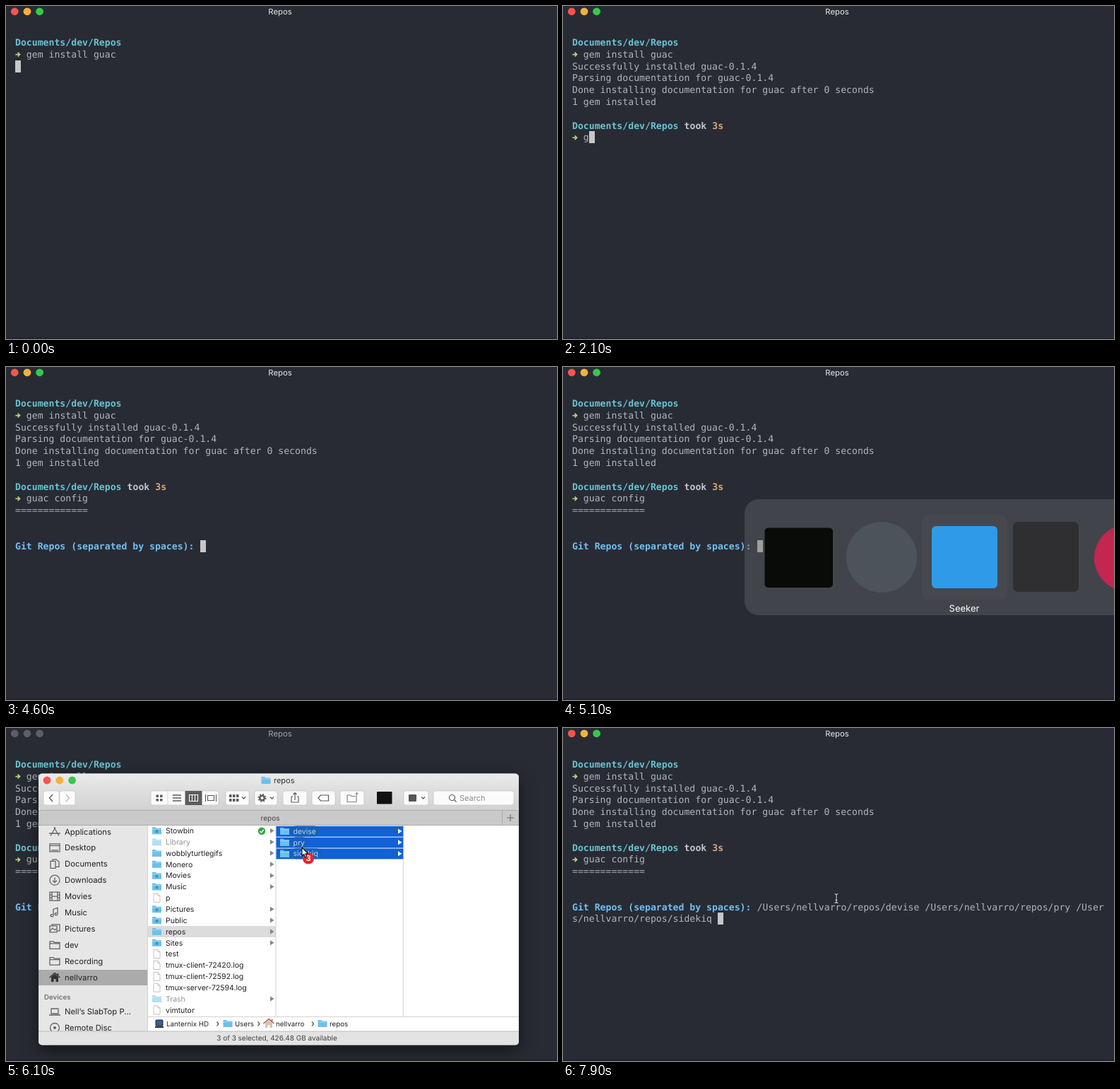
An HTML page for the animation above (8000 ms loop, 780 by 471 pixels).

```html
<!DOCTYPE html>
<html lang="en">
<head>
<meta charset="utf-8">
<title>Repos</title>
<style>
  html, body { margin: 0; width: 100%; height: 100%; overflow: hidden; background: #282b34; }
  svg { display: block; width: 100vw; height: 100vh; text-rendering: geometricPrecision; }
  text { font-family: Inter, "Open Sans", sans-serif; white-space: pre; }
  .mono { font: 13.17px "DejaVu Sans Mono", monospace; }
  .bold { font-weight: 700; }
  .window { filter: drop-shadow(0 7px 11px rgba(0,0,0,.5)); }
</style>
</head>
<body>
<svg id="stage" viewBox="0 0 780 471"></svg>
<script>
const LOOP = 8000, STEP = 100;
const COL = 7.93, ROW = 16.8, LEFT = 13;
const USER = 'nellvarro';
const INK = '#b0b4bb', CYAN = '#67c3d0', BLUE = '#70c0f2', ORANGE = '#d5a878', LIME = '#b9d77c';
const LIGHTS = ['#f5554c', '#f6b03c', '#36c849'];
const stage = document.getElementById('stage');

// drawing helpers
function el(parent, tag, attrs = {}, content) {
  const node = document.createElementNS('http://www.w3.org/2000/svg', tag);
  for (const key in attrs) node.setAttribute(key, attrs[key]);
  if (content !== undefined) node.textContent = content;
  parent.append(node);
  return node;
}
const group = (p, x = 0, y = 0) => el(p, 'g', { transform: `translate(${x} ${y})` });
const box = (p, x, y, width, height, fill, rx = 0, more = {}) =>
  el(p, 'rect', { x, y, width, height, fill, rx, ...more });
const dot = (p, cx, cy, r, fill, more = {}) => el(p, 'circle', { cx, cy, r, fill, ...more });
const ring = (p, x, y, r, color, width = 1.2, more = {}) =>
  dot(p, x, y, r, 'none', { stroke: color, 'stroke-width': width, ...more });
const stroke = (p, d, color, width = 1.2) =>
  el(p, 'path', { d, fill: 'none', stroke: color, 'stroke-width': width });
const label = (p, x, y, size, content, fill = '#222', more = {}) =>
  el(p, 'text', { x, y: y + size * .36, 'font-size': size, fill, ...more }, content);
const triangle = (p, x, y, fill) =>
  el(p, 'path', { d: `M${x} ${y - 3.5}l5.5 3.5l-5.5 3.5z`, fill });
const middle = { 'text-anchor': 'middle' };
const show = (node, on) => { node.style.display = on ? '' : 'none'; };

function mono(p, col, row, content, fill = INK, bold = false) {
  return el(p, 'text', {
    class: bold ? 'mono bold' : 'mono',
    x: LEFT + col * COL, y: 56 + row * ROW, fill
  }, content);
}
function folder(p, x, y) {
  const g = group(p, x, y);
  el(g, 'path', { d: 'M-6.5-5h4.5l1.5 1.5h7v8.5h-13z', fill: '#6cc0ea' });
  stroke(g, 'M-6.5-2.2h13', '#a5dcf6', .8);
  return g;
}
function house(p, x, y, fill, roof = fill) {
  const g = group(p, x, y);
  el(g, 'path', { d: 'M-5-1v7h3.5v-4h3v4h3.5v-7l-5-4z', fill });
  stroke(g, 'M-7.5 0L0-6.5L7.5 0M4.5-6v3', roof, 1.5);
}

// ---------- terminal ----------
const term = group(stage);
box(term, 0, 0, 780, 471, '#282b34');
box(term, 0, 469.5, 780, 1.5, '#1d2027');
box(term, 0, 0, 1, 471, '#30272f');
const lights = [12.3, 30, 47.6].map(x => dot(term, x, 7.8, 5.4, '#000'));
const title = label(term, 388, 8, 11.3, 'Repos', '#e9e9ea', middle);

function prompt(p, row, took) {
  mono(p, 0, row, 'Documents/dev/Repos', CYAN, true);
  if (took) {
    mono(p, 20, row, 'took', '#c0c4cb', true);
    mono(p, 25, row, took, ORANGE, true);
  }
  const y = 51.8 + (row + 1) * ROW;
  stroke(p, `M13.4 ${y}h5.6M16.6 ${y - 2.9}l3 2.9l-3 2.9`, LIME, 1.6);
}
prompt(term, 0);
mono(term, 2, 1, 'gem install guac');

const parts = [];
function part(from, draw) {
  const g = group(term);
  draw(g);
  parts.push({ g, from });
}
part(400, g => {
  mono(g, 0, 2, 'Successfully installed guac-0.1.4');
  mono(g, 0, 3, 'Parsing documentation for guac-0.1.4');
});
part(500, g => {
  mono(g, 0, 4, 'Done installing documentation for guac after 0 seconds');
  mono(g, 0, 5, '1 gem installed');
});
part(700, g => prompt(g, 7, '3s'));
part(3800, g => {
  mono(g, 0, 9, '='.repeat(13), '#a0a4aa');
  mono(g, 0, 12, 'Git Repos (separated by spaces):', BLUE, true);
});
part(7100, g => {
  const home = `/Users/${USER}/repos/`;
  const line = ['devise', 'pry', 'sidekiq'].map(n => home + n).join(' ');
  mono(g, 33, 12, line.slice(0, 62));
  mono(g, 0, 13, line.slice(62));
});
const COMMAND = 'guac config';
const KEYS = [2100, 2200, 2300, 2400, 2600, 2700, 2800, 3000, 3100, 3200, 3400];
const typed = mono(term, 2, 8, '');
const block = box(term, 0, 0, 8, 17, '#c7c7c8');

function blockAt(t, count) {
  if (t < 400) return [0, 2];
  if (t < 500) return [0, 4];
  if (t < 700) return [0, 6];
  if (t < 3800) return [2 + count, 8];
  return t < 7100 ? [33, 12] : [26, 13];
}

// ---------- file window ----------
const win = group(stage);
win.setAttribute('class', 'window');
const defs = el(stage, 'defs');
const bar = el(defs, 'linearGradient', { id: 'bar', x2: 0, y2: 1 });
el(bar, 'stop', { offset: 0, 'stop-color': '#ebeaeb' });
el(bar, 'stop', { offset: 1, 'stop-color': '#d3d2d3' });
box(win, 46, 64.5, 680, 384, '#e9e8e9', 5);
box(win, 46, 64.5, 680, 51.5, 'url(#bar)', 5);
stroke(win, 'M50 65h672', '#f6f6f6', 1);
LIGHTS.forEach((c, i) => dot(win, 58 + i * 17.8, 74, 5.4, c));
folder(win, 368, 74);
label(win, 379, 74, 11, 'repos', '#333');

// toolbar
const DARK = '#5b5b5d';
const BUTTONS = [[53, 22], [76, 22], [205, 96], [311, 33], [352, 32], [392, 34],
  [433, 33], [473, 34], [563, 35], [605, 114]];
for (const [x, width] of BUTTONS)
  box(win, x, 89, width, 20, '#fbfbfb', 3, { stroke: '#c3c2c3', 'stroke-width': .7 });
stroke(win, 'M66 94l-4.5 5l4.5 5', DARK, 1.4);
stroke(win, 'M85 94l4.5 5l-4.5 5', '#b9b9b9', 1.4);
box(win, 253.5, 89, 24, 20, '#5d5d60');
stroke(win, 'M229 89v20', '#c9c9c9', .7);
for (const x of [212.5, 218]) for (const y of [94.5, 100]) box(win, x, y, 3.5, 3.5, DARK, .5);
stroke(win, 'M236 95h12M236 99h12M236 103h12', DARK, 1.3);
stroke(win, 'M259.5 94.5h12v9h-12zM263.5 94v10M267.5 94v10', '#fff', 1.1);
stroke(win, 'M285.5 95.5h9v7h-9zM282.5 94v10M297.5 94v10', DARK, 1.1);
for (const x of [316, 321, 326]) for (const y of [94, 100]) box(win, x, y, 3.5, 4, DARK, .5);
stroke(win, 'M334 97.5l2.5 2.5l2.5-2.5M374 97.5l2.5 2.5l2.5-2.5M588 97.5l2.5 2.5l2.5-2.5', DARK, 1.3);
ring(win, 362.5, 99, 3.3, DARK, 2.4);
ring(win, 362.5, 99, 5.2, DARK, 1.6, { 'stroke-dasharray': '2 2.08' });
stroke(win, 'M406 97h-2v8h10v-8h-2M409 102v-10M406.5 94l2.5-2.5l2.5 2.5', DARK);
stroke(win, 'M442 99l3.5-4h11v8h-11z', DARK);
stroke(win, 'M483 95h5l1 1.5h7v8h-13zM494 93h5M496.5 90.5v5', '#858587');
box(win, 525, 90, 21.5, 17.5, '#111', 1);
box(win, 570, 94, 11, 10, '#555', 1);
stroke(win, 'M634.5 101.5l3 3', DARK);
ring(win, 631.5, 98.5, 4, DARK);
label(win, 642, 99, 11, 'Search', '#8b8b8d');

// tab strip
box(win, 46, 116, 680, 21.5, '#cac9ca');
stroke(win, 'M46 116.5h680M46 137.5h680M702.5 116v21', '#aeadae', 1);
label(win, 374, 127, 10, 'repos', '#444', middle);
stroke(win, 'M714 122v10M709 127h10', '#666', 1.1);

// sidebar
const FOLDER = 'M-7-5h5l1.5 1.5h7.5v9h-14zM-7-2h14';
const PLACES = [
  ['Applications', 'M-6 6L1-6M6 6L-1-6M-8 2.5h16'],
  ['Desktop', 'M-7-5.5h14v11h-14zM-7-3h14M-5 3.5h10'],
  ['Documents', 'M-6-4h7v10h-7zM-3-4v-2.5h5l4 3.5v7h-5'],
  ['Downloads', 'M-7 0a7 7 0 1 0 14 0a7 7 0 1 0-14 0M0-4v7M-3 .5l3 3l3-3'],
  ['Movies', 'M-7-6h14v12h-14zM-4-6v12M4-6v12M-4 0h8M-7-2h3M-7 2h3M4-2h3M4 2h3'],
  ['Music', 'M-2 4.5v-9l6-2v9M-2 4.5a2 1.5 0 1 1-1-1.5M4 2.5a2 1.5 0 1 1-1-1.5'],
  ['Pictures', 'M-7-4h10v9h-10zM-4-4v-2h11v9h-4M-6 3l3-4l3 3l2-2'],
  ['dev', FOLDER],
  ['Recording', FOLDER]
];
const ICON = '#636365', SIDE = 11.3;
box(win, 46, 138, 154, 291, '#e7e6e7');
PLACES.forEach(([name, d], i) => {
  const y = 146.5 + i * 22.9;
  stroke(group(win, 69, y), d, ICON, 1.3);
  label(win, 83, y, SIDE, name);
});
box(win, 46, 342, 154, 22, '#abaaad');
house(win, 69, 353, '#333');
label(win, 83, 353, SIDE, USER);
label(win, 54, 381, 9.7, 'Devices', '#717173', { 'font-weight': 600 });
stroke(group(win, 69, 401), 'M-5-4h10v7h-10zM-8 5h16', ICON, 1.3);
label(win, 83, 400.7, SIDE, 'Nell’s SlabTop P...');
ring(win, 69, 424, 6.5, ICON, 1.3);
dot(win, 69, 424, 2, ICON);
label(win, 83, 423.5, SIDE, 'Remote Disc');

// columns
const LINE = 15.85, LIST = 10.5;
box(win, 201, 138, 525, 291, '#fff');
box(win, 201, 280, 181, 16, '#dcdcdc');
stroke(win, 'M200.5 138v291M382 138v270M562.3 138v270', '#d2d2d2', 1);
// kinds: d plain folder, m marked folder, x dimmed folder, f file
const ENTRIES = [
  ['Stowbin', 'm'], ['Library', 'x'], ['wobblyturtlegifs', 'd'], ['Monero', 'd'],
  ['Movies', 'm'], ['Music', 'm'], ['p', 'f'], ['Pictures', 'm'], ['Public', 'm'],
  ['repos', 'd'], ['Sites', 'm'], ['test', 'f'], ['tmux-client-72420.log', 'f'],
  ['tmux-client-72592.log', 'f'], ['tmux-server-72594.log', 'f'], ['Trash', 'x'], ['vimtutor', 'f']
];
ENTRIES.forEach(([name, kind], i) => {
  const y = 145.3 + i * LINE;
  if (kind === 'f') {
    const page = group(win, 213.5, y);
    el(page, 'path', { d: 'M-4.5-6h6l3 3v9h-9zM1.5-6v3h3', fill: '#fff', stroke: '#bcbcbc', 'stroke-width': .9 });
  } else {
    const f = folder(win, 213.5, y);
    if (kind === 'x') f.setAttribute('opacity', .5);
    if (kind === 'm') box(f, -2, -1, 4, 4, '#3c94c4', 1);
    triangle(win, 374, y, '#858585');
  }
  label(win, 226, y, LIST, name, kind === 'x' ? '#929292' : '#222');
});
dot(win, 362, 145.7, 5.2, '#35a53f');
stroke(win, 'M359.5 146l2 2l3.3-4.3', '#fff', 1.4);

const REPOS = [['devise', 41], ['pry', 24], ['sidekiq', 44]];
REPOS.forEach(([name], i) => {
  const y = 146 + i * LINE;
  box(win, 382.5, y - 7.2, 179.8, 14.9, '#1062d5');
  folder(win, 394.5, y);
  label(win, 406.5, y, LIST, name, '#fff');
  triangle(win, 555, y, '#fff');
});

// path and status bars
stroke(win, 'M201 408.5h525', '#d2d2d2', 1);
box(win, 212, 413, 10, 8, '#315fa8', 1, { stroke: '#222' });
box(win, 211, 421.5, 12, 2.5, '#333');
folder(win, 314, 418);
house(win, 372, 418, '#d8c4a8', '#a8604f');
folder(win, 448, 418);
for (const [x, name] of [[227, 'Lanternix HD'], [324, 'Users'], [382, USER], [458, 'repos']])
  label(win, x, 418, 9.8, name);
for (const x of [298.5, 356.5, 433]) stroke(win, `M${x} 415.5l2.5 3l-2.5 3`, '#555', 1.2);
el(win, 'path', { d: 'M46 429h680v14.5a5 5 0 0 1-5 5h-670a5 5 0 0 1-5-5z', fill: '#e4e3e4' });
stroke(win, 'M46 429h680', '#bdbcbd', 1);
label(win, 383.5, 438.5, 9.95, '3 of 3 selected, 426.48 GB available', '#444', middle);
box(win, 45.7, 64.2, 680.6, 384.6, 'none', 5, { stroke: '#16181d', 'stroke-opacity': .5, 'stroke-width': .6 });

// ---------- app switcher ----------
const switcher = group(stage);
box(switcher, 257, 187, 760, 164, 'rgba(104,104,108,.42)', 20);
const choice = box(switcher, 508, 209, 121, 120, 'rgba(90,90,90,.18)', 9);
box(switcher, 285.5, 227.5, 96.5, 84.5, '#090b09', 5);
dot(switcher, 451, 269, 50, '#4d535b');
box(switcher, 522, 225, 93, 88, '#2f9be8', 6);
box(switcher, 637, 219, 93, 99, '#2f2f31', 7);
dot(switcher, 799, 270, 47, '#c3264f');
const appName = label(switcher, 568, 341, 13, '', '#fff', middle);

// ---------- drag and pointer ----------
const drag = group(stage);
REPOS.forEach(([name, width], i) => {
  const y = 160 + i * LINE;
  folder(drag, 394.5, y);
  box(drag, 403, y - 7.5, width, 15, '#1760bd', 7.5);
  label(drag, 406.5, y, LIST, name, '#b9d3f2');
});
dot(drag, 428, 198.5, 8, '#e5282e');
label(drag, 428, 198.5, 11, '3', '#fff', { ...middle, 'font-weight': 700 });

const pointer = group(stage);
const shape = d => el(pointer, 'path', {
  d, fill: '#fff', stroke: '#111', 'stroke-width': 1.1, 'stroke-linejoin': 'round'
});
const hand = shape('M-1 7V1.2a1.5 1.5 0 0 1 3 0V5.5l5 1a1.8 1.8 0 0 1 1.2 2l-.8 4l-1 2.5H.5L-3.5 9a1.3 1.3 0 0 1 2.5-2z');
const arrow = shape('M0 0v12l2.8-2.5l2 4.7l2-.9l-2-4.5h3.8z');
const beam = group(pointer);
const BEAM = 'M-2.5-6.5q2.5 0 2.5 2v9q0 2-2.5 2M2.5-6.5q-2.5 0-2.5 2M2.5 6.5q-2.5 0-2.5-2M-1.5 2.5h3';
stroke(beam, BEAM, '#16181d', 2.4);
stroke(beam, BEAM, '#dadada', 1.1);

const TRACK = [
  [5200, 247, 214], [5400, 247, 214], [5900, 419, 169], [6200, 419, 169],
  [6600, 419, 183], [7000, 387, 241], [8000, 387, 241]
];
function pointerAt(t) {
  const i = Math.max(1, TRACK.findIndex(k => k[0] > t));
  const [t0, x0, y0] = TRACK[i - 1], [t1, x1, y1] = TRACK[i];
  const u = Math.min(1, Math.max(0, (t - t0) / (t1 - t0)));
  const e = u * u * (3 - 2 * u);
  return [x0 + (x1 - x0) * e, y0 + (y1 - y0) * e];
}

// ---------- playback ----------
function render(t) {
  const away = t >= 5200 && t < 6400;
  lights.forEach((l, i) => l.setAttribute('fill', away ? '#5c5e64' : LIGHTS[i]));
  title.setAttribute('fill', away ? '#a0a2a7' : '#e9e9ea');
  parts.forEach(p => show(p.g, t >= p.from));

  const count = KEYS.filter(k => k <= t).length;
  typed.textContent = COMMAND.slice(0, count);
  const [col, row] = blockAt(t, count);
  block.setAttribute('x', Math.round(LEFT + col * COL));
  block.setAttribute('y', Math.round(43 + row * ROW));

  show(win, away);
  show(switcher, t >= 4800 && t < 5500);
  switcher.setAttribute('opacity', t <= 5200 ? 1 : Math.max(0, 1 - (t - 5200) / 250));
  const second = t < 5000;
  choice.setAttribute('x', second ? 390 : 508);
  appName.setAttribute('x', second ? 451 : 568);
  appName.textContent = second ? 'Player' : 'Seeker';

  const [x, y] = pointerAt(t);
  show(pointer, t >= 5200);
  pointer.setAttribute('transform', `translate(${x} ${y})`);
  show(hand, t < 5500);
  show(arrow, t >= 5500 && t < 6400);
  show(beam, t >= 6400);
  show(drag, t >= 6000 && t < 7100);
  drag.setAttribute('transform', `translate(${x - 419} ${y - 183})`);
}

const start = performance.now();
function tick() {
  const t = (performance.now() - start) % LOOP;
  render(Math.floor(t / STEP) * STEP);
  requestAnimationFrame(tick);
}
tick();
</script>
</body>
</html>
```
